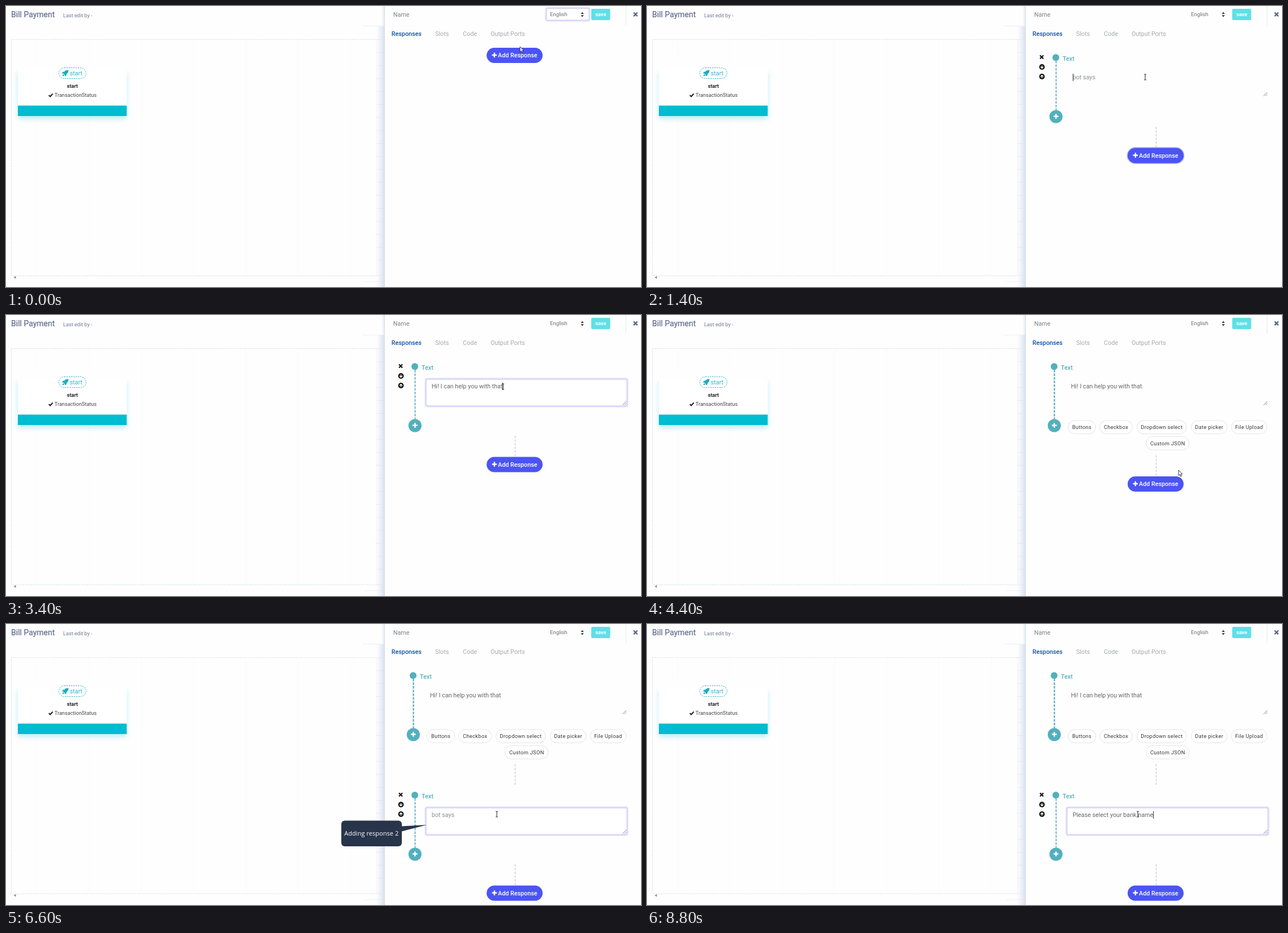
Write an HTML page that moves like this. It is 1123 px wide and 498 px high and loops after 9 s.

```html
<!DOCTYPE html>
<html lang="en">
<head>
<meta charset="utf-8">
<title>Response editor</title>
<style>
html, body { margin: 0; width: 100%; height: 100%; overflow: hidden; background: #fefefe; }
svg { display: block; width: 1123px; height: 498px; }
text { font-family: Roboto, sans-serif; font-size: 10.75px; white-space: pre; }
.m { font-weight: 500; }
.b { font-weight: 700; }
.small { font-size: 9.2px; }
.chip { font-size: 9.3px; letter-spacing: .3px; fill: #38383c; }
.callout { font: 11.1px "Open Sans", sans-serif; fill: #fff; }
</style>
</head>
<body>
<svg viewBox="0 0 1123 498">
  <defs>
    <linearGradient id="edge">
      <stop offset="0" stop-color="#dfe6f3" stop-opacity="0"/>
      <stop offset="1" stop-color="#d9e1ef"/>
    </linearGradient>
    <filter id="glow" x="-10%" y="-20%" width="120%" height="150%">
      <feDropShadow dx="0" dy="5" stdDeviation="4" flood-color="#00bcd0" flood-opacity=".26"/>
    </filter>
  </defs>

  <!-- Flow canvas -->
  <text x="9" y="20" style="font-size:14px" fill="#5f6b8d" stroke="#5f6b8d" stroke-width=".2">Bill Payment</text>
  <text class="small" x="101" y="20" fill="#6f7a96">Last edit by -</text>
  <g id="grid" stroke="#f9fafa"></g>
  <path d="M669 59.5H9.5V478H669" fill="none" stroke="#d5e3e6" stroke-dasharray="3 1.5"/>
  <path d="M630 35.5h39M635 488.5h34" stroke="#eceff5"/>
  <path d="M17.5 478.5v5l-4-2.5z" fill="#8d8d8d"/>
  <rect x="655" y="36" width="14" height="462" fill="url(#edge)"/>
  <rect x="664" width="5" height="36" fill="url(#edge)" opacity=".7"/>

  <!-- Start card -->
  <rect x="21" y="113" width="192.500" height="82" fill="#fff" filter="url(#glow)"/>
  <rect x="15" y="98" width="205" height="15" fill="#fefefe"/>
  <rect x="21" y="176.500" width="192.500" height="18.500" fill="#00bcd0"/>
  <rect x="93.500" y="109.500" width="48" height="19" rx="9.500" fill="#fff" stroke="#35b6c6" stroke-dasharray="2.500 1.500"/>
  <path d="M110.500 113.500q-5-.3-7.500 3l-2.500.3-1.500 2.700 2.500.3 2.300 2.300.3 2.500 2.700-1.500.3-2.500q3.500-2.300 3.400-7.100zM101.500 121q-2 .5-1.700 3.200 2.700.2 3.200-1.700z" fill="#18aebf"/>
  <text x="112.800" y="122.800" fill="#35b4c4">start</text>
  <text class="b small" x="117.500" y="144.500" text-anchor="middle" fill="#222">start</text>
  <path d="M75.800 158l2.300 2.400 4.600-4.800" fill="none" stroke="#222" stroke-width="2.100"/>
  <text class="small" x="85.800" y="161" fill="#444">TransactionStatus</text>

  <!-- Side panel -->
  <rect x="669" width="454" height="498" fill="#fefefe"/>
  <path d="M669.500 0V498" stroke="#d9dde6"/>
  <text x="684.800" y="18.500" fill="#7d8088">Name</text>
  <rect x="1035" y="5" width="33.500" height="20" rx="2" fill="#5fe0e6"/>
  <text class="b small" x="1051.800" y="18" text-anchor="middle" fill="#fff">save</text>
  <path d="M1096.500 0V34" stroke="#e6e8ee"/>
  <path d="M1110 11.500l6.600 6.600m0-6.600l-6.600 6.600" stroke="#56658a" stroke-width="2.400"/>
  <text class="m" x="681.800" y="52.800" fill="#0d52a8">Responses</text>
  <g fill="#a6a8ac">
    <text x="759" y="52.800">Slots</text>
    <text x="808" y="52.800">Code</text>
    <text x="857" y="52.800">Output Ports</text>
  </g>
  <g id="scene"></g>
</svg>
<script>
const STEP = 200, LOOP = 9000;
const GREETING = "Hi! I can help you with that";
const QUESTION = "Please select your bank name";
const $ = id => document.getElementById(id);
const pen = document.createElement("canvas").getContext("2d");
pen.font = "10.75px Roboto, sans-serif";

// Pointer path: time, x, y
const path = [
  [0, 909, 72], [400, 905, 88], [800, 905, 88], [1400, 881, 126], [1800, 879, 127],
  [3400, 879, 127], [4000, 925, 262], [4400, 940, 275], [5000, 915, 300], [5600, 868, 337], [LOOP, 868, 337]
];

let lines = "";
for (let x = 54; x < 655; x += 92.5) lines += `M${x} 60V478`;
$("grid").innerHTML = `<path d="${lines}"/>` +
  Array.from({ length: 17 }, (_, i) => `<path d="M655 ${82.5 + i * 23}h14" stroke="#e6ebf3"/>`).join("") +
  '<path d="M655.5 60V478" stroke="#edf0f5" stroke-dasharray="2 1"/>';

const plus = (x, y, r, w) =>
  `<path d="M${x - r} ${y}h${2 * r}M${x} ${y - r}v${2 * r}" stroke="#fff" stroke-width="${w}"/>`;

const ring = (x, y, w, h) =>
  `<rect x="${x}" y="${y}" width="${w}" height="${h}" rx="3" fill="#fff" stroke="#dfdefb" stroke-width="3"/>
   <rect x="${x + 1}" y="${y + 1}" width="${w - 2}" height="${h - 2}" rx="2" fill="none" stroke="#c9c8f1" stroke-width=".7"/>`;

const connector = y =>
  `<path d="M900.5 ${y}v37" stroke="#cfd0f1" stroke-width="1.6" stroke-dasharray="4 2.5"/>`;

const addButton = (y, focus) =>
  (focus ? `<rect x="848.500" y="${y - 15}" width="102" height="30" rx="15" fill="#bcbef9"/>` : "") +
  `<rect x="850" y="${y - 13.5}" width="99" height="27" rx="13.500" fill="#4b54f4"/>` +
  plus(863.8, y - .5, 4.3, 2.4) +
  `<text class="m" x="870" y="${y + 3.5}" fill="#fff">Add Response</text>`;

function tools() {
  const arrow = (y, dir) =>
    `<circle cx="698.500" cy="${y}" r="4.900" fill="#111"/>
     <path d="M698.500 ${y - 2.8 * dir}v${5 * dir}m-2.600 ${-2.4 * dir}l2.600 ${2.6 * dir}l2.600 ${-2.6 * dir}" fill="none" stroke="#fff" stroke-width="1.300"/>`;
  return '<path d="M695 87.500l6 6m0-6l-6 6" stroke="#111" stroke-width="2.200"/>' + arrow(108, 1) + arrow(125, -1);
}

function block({ y = 0, active, focus, typed, caret }) {
  const dx = active ? 0 : -3, x = 723 + dx, tx = 752.7 + dx;
  const cx = Math.round(tx + pen.measureText(typed).width) + .5;
  return `<g transform="translate(0 ${y})">
    ${active ? tools() : ""}
    <path d="M${x + .5} 97V185" stroke="#5aa9b7" stroke-width="${active ? 1.7 : 2.2}" stroke-dasharray="4.500 2"/>
    <circle cx="${x}" cy="91.300" r="6" fill="#52b0be"/>
    <circle cx="${x + .3}" cy="196" r="11.600" fill="#52b0be"/>${plus(x + .3, 195.5, 4.3, 2.4)}
    <text class="m" x="${735 + dx}" y="97" fill="#52b0be">Text</text>
    ${focus ? ring(742, 113, 357, 49) : ""}
    <path d="M1090.500 159.500l6.500-6.500m-3 6.500l3-3" stroke="#777" stroke-width=".9"/>
    <text x="${tx}" y="130" fill="${typed ? "#65666b" : "#8b8d93"}">${typed || "bot says"}</text>
    ${caret ? `<path d="M${cx} 120v13" stroke="#333"/>` : ""}</g>`;
}

function chips() {
  const chip = (x, y, w, label) =>
    `<rect x="${x}" y="${y}" width="${w}" height="23.500" rx="11.750" fill="#fff" stroke="#e3e4e8"/>
     <text class="chip" x="${x + w / 2}" y="${y + 15.2}" text-anchor="middle">${label}</text>`;
  return chip(744.5, 187, 49, "Buttons") + chip(800.5, 187, 58, "Checkbox") + chip(866.5, 187, 87.5, "Dropdown select") +
    chip(962.5, 187, 63.5, "Date picker") + chip(1033.5, 187, 63, "File Upload") + chip(882.5, 215.5, 76.5, "Custom JSON");
}

const select = focus =>
  (focus ? ring(955, 3.5, 77, 22.5) : "") +
  `<text x="962" y="18" style="font-size:9.5px" fill="#6b6e75">English</text>
   <path d="M1016.500 14l2.700-3.200 2.700 3.200zm0 2.200l2.700 3.200 2.700-3.200z" fill="#333"/>`;

const callout = () =>
  `<path d="M698 358.500L744 356L698 368z" fill="#28344a"/>
   <rect x="593" y="348.500" width="107" height="45.500" rx="6" fill="#28344a"/>
   <text class="callout" x="646.300" y="375.300" text-anchor="middle">Adding response 2</text>`;

function pointer(t) {
  const i = path.findIndex(p => p[0] > t), [a, b] = [path[i - 1], path[i]];
  const k = (t - a[0]) / (b[0] - a[0]);
  const x = a[1] + (b[1] - a[1]) * k, y = a[2] + (b[2] - a[2]) * k;
  const beam = t >= 1200 && t < 3600 || t >= 5400;
  return `<g transform="translate(${x} ${y})">` + (beam
    ? '<path d="M-2-5h1.500l.5.700.5-.7H2M0-4.300V4.300M-2 5h1.500l.5-.7.5.7H2" fill="none" stroke="#222"/>'
    : '<path d="M0 0v9.500l2.200-2 1.500 3.600 1.700-.7-1.500-3.500h3z" fill="#fff" stroke="#222" stroke-width=".9"/>') + "</g>";
}

const type = (text, t, from, to) =>
  text.slice(0, Math.round(text.length * Math.min(1, Math.max(0, (t - from) / (to - from)))));

function scene(t) {
  const first = t >= 800, left = t >= 4400, second = t >= 5000;
  let out = select(!first);
  if (first) out += block({
    active: !left, focus: t >= 1600 && !left, typed: type(GREETING, t, 1700, 2400),
    caret: t >= 1400 && t < 2800 || t >= 3200 && t < 3800
  }) + connector(left ? 248.5 : 214);
  if (left) out += chips();
  if (second) out += block({
    y: 212, active: true, focus: t >= 5800, typed: type(QUESTION, t, 7200, 8800),
    caret: t >= 5800 && t < 6200 || t >= 7000
  }) + connector(426);
  out += addButton(second ? 477 : left ? 299.5 : first ? 265 : 87.5, first && t < 1600 || second && t < 5800);
  if (t >= 6600 && t < 7800) out += callout();
  return out + pointer(t);
}

let shown = -1;
function frame(now) {
  const t = Math.floor(now % LOOP / STEP) * STEP;
  if (t !== shown) $("scene").innerHTML = scene(shown = t);
  requestAnimationFrame(frame);
}
frame(performance.now());
</script>
</body>
</html>
```
